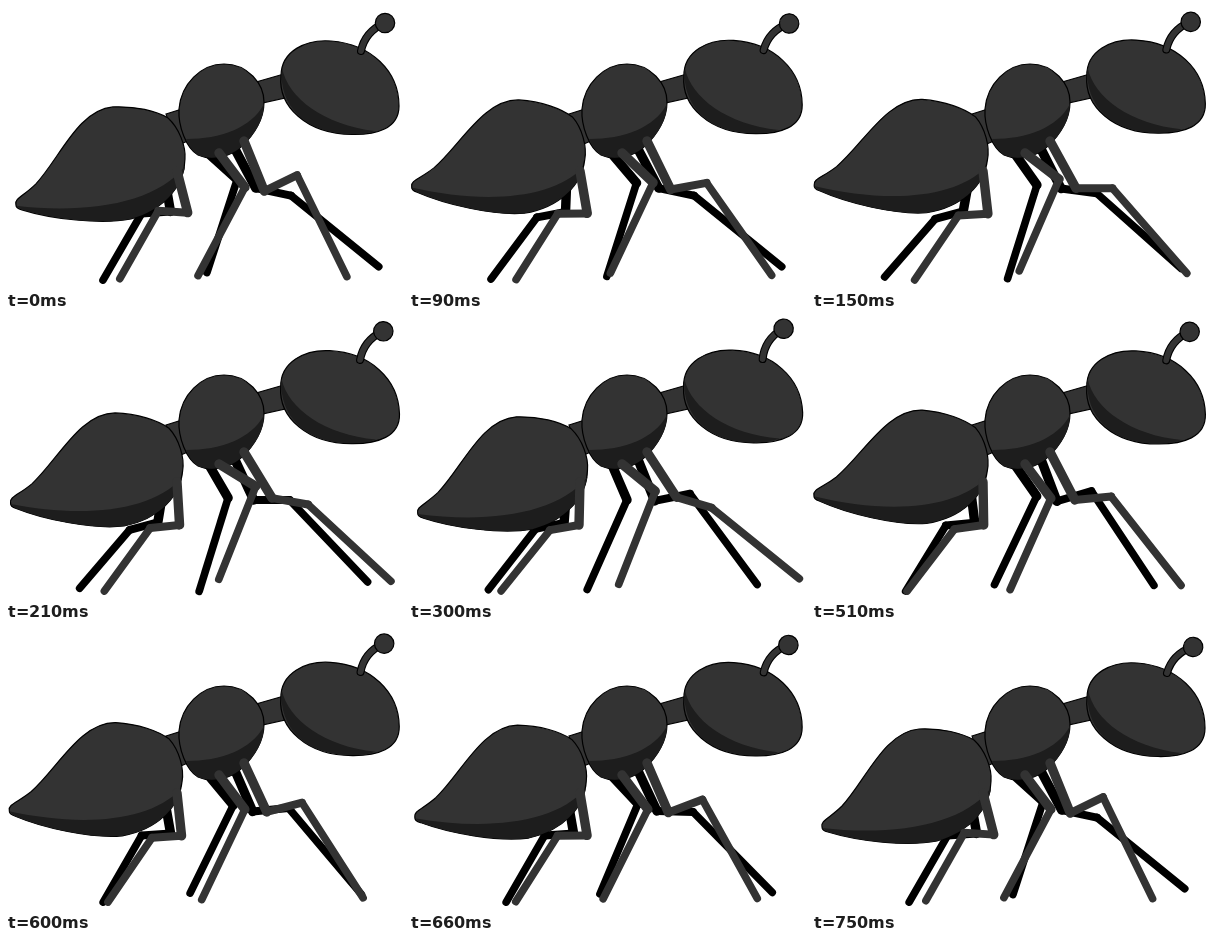
Recreate the animation shown at these times as an HTML page without scripts. Size 397 px wide and 283 px high, loop 780 ms.

```html
<!DOCTYPE html>
<html lang="en">
<head>
<meta charset="utf-8">
<title>Walking ant</title>
<style>
  html, body { margin: 0; width: 100%; height: 100%; overflow: hidden; background: #fff; }
  svg { display: block; width: 397px; height: 283px; }
  .skin { fill: #333; stroke: #000; stroke-width: 1.2; }
  .shade { fill: #1d1d1d; }
  .stem { fill: none; stroke-linecap: round; }

  /* Every joint turns from --rest to --reach (1) and back (0) along its --beat. */
  .joint { animation: swing 780ms linear(var(--beat)) infinite; }
  @keyframes swing {
    from { rotate: var(--rest); }
    to { rotate: var(--reach); }
  }
  .abdomen { transform-origin: 172px 124px; --rest: 0deg; --reach: 8.2deg; --beat: 0, 1 15%, 0 42%, 1 69%, 0 96%, 0; }
  .head { transform-origin: 275px 80px; --rest: 0deg; --reach: -2.2deg; --beat: 0, 1 40%, 0 96%, 0; }
  .antenna { transform-origin: 355px 45px; --rest: 0deg; --reach: 4.5deg; --beat: 0, .9 11%, 0 27%, -.9 38%, 0 50%, 0 77%, 1 96%, 1; }

  .leg path { stroke-width: 8; stroke-linecap: round; }
  .leg > .joint > path { stroke-width: 9.4; }
  .leg .foot > path { stroke-width: 7.6; }
  .far { stroke: #000; }
  .near { stroke: #333; }
</style>
</head>
<body>
<svg viewBox="0 0 397 283">
  <g class="far">
    <g class="leg" style="translate: 158px 168px; --beat: 0, 1 21%, 0 72%, 0">
      <g class="joint" style="--rest: 80deg; --reach: 102deg">
        <path d="M0 0H38"/>
        <g class="joint" style="translate: 38px 0; --rest: 96deg; --reach: 62deg">
          <path d="M0 0H29"/>
          <g class="joint foot" style="translate: 29px 0; --rest: -56deg; --reach: -32deg"><path d="M0 0H77"/></g>
        </g>
      </g>
    </g>
    <g class="leg" style="translate: 203px 148px; --beat: 0, 1 38%, 0 96%, 0">
      <g class="joint" style="--rest: 42deg; --reach: 67deg">
        <path d="M0 0H38"/>
        <g class="joint foot" style="translate: 38px 0; --rest: 66deg; --reach: 44deg; --beat: 0, 1 32%, 0 77%, 0"><path d="M0 0H98"/></g>
      </g>
    </g>
    <g class="leg" style="translate: 230px 145px; --beat: 0, 0 15%, 1 54%, 0 96%, 0">
      <g class="joint" style="--rest: 62deg; --reach: 72deg">
        <path d="M0 0H42"/>
        <g class="joint" style="translate: 42px 0; --rest: -50deg; --reach: -99deg">
          <path d="M0 0H36"/>
          <g class="joint foot" style="translate: 36px 0; --rest: 27deg; --reach: 90deg"><path d="M0 0H113"/></g>
        </g>
      </g>
    </g>
  </g>

  <path class="skin" d="M160,108 L176,103 L182,135 L170,140Z"/>
  <path class="skin" d="M250,76 L278,68 L279,92 L252,98Z"/>

  <g class="joint abdomen">
    <path class="skin" d="M10,199 C8,193 18,190 30,178 C54,152 72,104 107,101 C130,100 150,105 162,112 C173,122 180,140 179,153 C179,178 160,203 125,213 C95,219 45,213 16,204 C11,203 10,201 10,199Z"/>
    <path class="shade" d="M10,200 C80,208 150,198 179,160 C176,181 158,204 125,213 C95,219 45,213 16,204Z"/>
  </g>

  <path class="skin" d="M173,103 C175,78 195,58 218,58 C242,58 258,78 258,96 C258,112 249,128 236,140 C225,151 205,155 192,149 C180,142 172,120 173,103Z"/>
  <path class="shade" d="M180,133 C215,133 245,122 258,98 C258,114 249,128 236,140 C225,151 205,155 192,149 C187,146 183,140 180,133Z"/>

  <g class="joint head">
    <path class="skin" d="M275,70 C275,45 300,33 325,35 C365,38 393,65 393,100 C393,123 370,129 346,128.5 C300,128 272,100 275,70Z"/>
    <path class="shade" d="M276,62 C282,92 318,119 369,125 C361,128 353,128 346,128 C300,128 272,100 276,62Z"/>
    <g class="joint antenna">
      <path class="stem" stroke="#000" stroke-width="8" d="M355,45 C357,35 363,24 378,17"/>
      <path class="stem" stroke="#333" stroke-width="5.8" d="M355,45 C357,35 363,24 378,17"/>
      <circle class="skin" cx="379" cy="17" r="9.7"/>
    </g>
  </g>

  <g class="near">
    <g class="leg" style="translate: 171px 165px; --beat: 0, 1 50%, 0 96%, 0">
      <g class="joint" style="--rest: 75.5deg; --reach: 96deg">
        <path d="M0 0H43"/>
        <g class="joint" style="translate: 43px 0; --rest: 108deg; --reach: 70deg">
          <path d="M0 0H29.5"/>
          <g class="joint foot" style="translate: 29.5px 0; --rest: -64deg; --reach: -34.5deg"><path d="M0 0H78"/></g>
        </g>
      </g>
    </g>
    <g class="leg" style="translate: 213px 147px; --beat: 0, 1 30%, 0 50%, 0">
      <g class="joint" style="--rest: 53deg; --reach: 29deg">
        <path d="M0 0H43"/>
        <g class="joint foot" style="translate: 43px 0; --rest: 65deg; --reach: 82deg; --beat: 0, 1 30%, -.35 50%, 0 96%, 0"><path d="M0 0H100"/></g>
      </g>
    </g>
    <g class="leg" style="translate: 238px 135px; --beat: 0, 1 34.5%, 0 91%, 0">
      <g class="joint" style="--rest: 68deg; --reach: 56deg">
        <path d="M0 0H54"/>
        <g class="joint" style="translate: 54px 0; --rest: -94deg; --reach: -36deg">
          <path d="M0 0H36.5"/>
          <g class="joint foot" style="translate: 36.5px 0; --rest: 90deg; --reach: 17deg"><path d="M0 0H113"/></g>
        </g>
      </g>
    </g>
  </g>
</svg>
</body>
</html>
```
